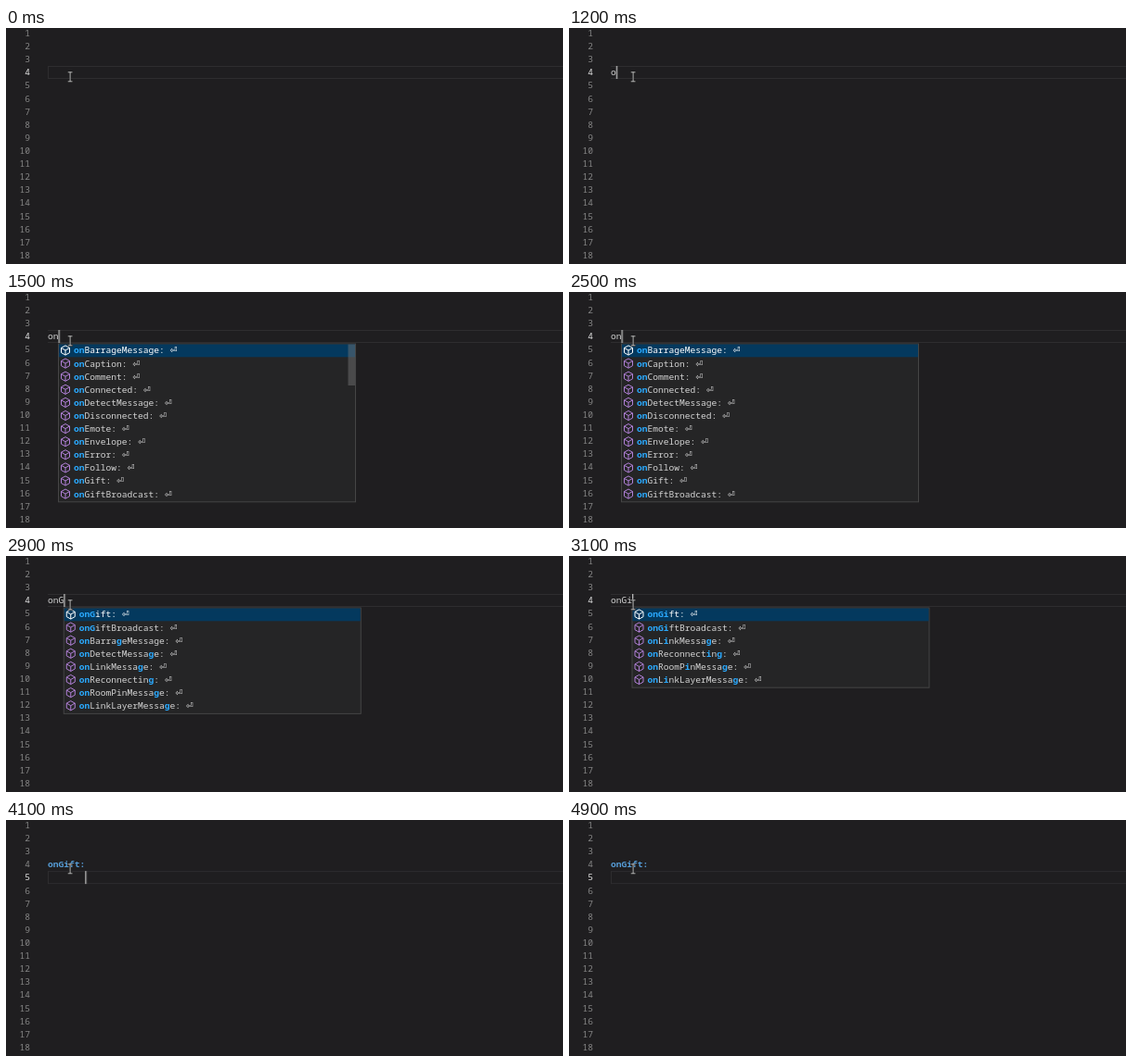
Write an HTML page that moves like this. It is 600 px wide and 255 px high and loops after 5 s.

```html
<!DOCTYPE html>
<html lang="en">
<head>
<meta charset="utf-8">
<title>Editor completion</title>
<style>
  html, body { margin: 0; width: 100%; height: 100%; overflow: hidden; background: #1f1e20; }
  svg { display: block; width: 600px; height: 255px; }
  text { font: 9.58px "Noto Sans Mono", "DejaVu Sans Mono", monospace; fill: #d4d4d4; }
  .num { fill: #858585; text-anchor: end; }
  .hit { fill: #2aaaff; font-weight: 700; }
  .enter { font-family: "DejaVu Sans", sans-serif; }
  .cube { fill: none; stroke: #b180d7; stroke-linejoin: round; }
  .picked text { fill: #fff; }
  .picked .cube { stroke: #fff; }
  .done { fill: #569cd6; font-weight: 700; }
  .line { fill: none; stroke: #2e2d2f; }

  .step { animation: 5s step-end infinite; }
  .line { animation-name: next-line; }
  .edge { animation-name: edge; }
  .caret { fill: #c8c8c8; animation-name: caret; }
  .bar { fill: #797979; animation: bar 5s linear infinite; }
  #n4 { animation-name: leave; }
  #n5 { animation-name: enter; }

  @keyframes next-line { 0% { transform: none; } 82%, 100% { transform: translateY(14.12px); } }
  @keyframes edge { 0% { opacity: 1; } 24% { opacity: 0; } 82%, 100% { opacity: 1; } }
  @keyframes leave { 0% { fill: #e0e0e0; } 82%, 100% { fill: #858585; } }
  @keyframes enter { 0% { fill: #858585; } 82%, 100% { fill: #e0e0e0; } }
  @keyframes bar { 0%, 36% { opacity: .45; } 47%, 100% { opacity: 0; } }
  @keyframes caret {
    0%  { opacity: 0; transform: none; }
    10% { opacity: 1; transform: none; }
    20% { opacity: 0; transform: none; }
    24% { opacity: 1; transform: translate(5.75px, 0); }
    28% { opacity: 1; transform: translate(11.5px, 0); }
    38% { opacity: 0; transform: translate(11.5px, 0); }
    48% { opacity: 1; transform: translate(11.5px, 0); }
    58% { opacity: 1; transform: translate(17.25px, 0); }
    62% { opacity: 1; transform: translate(23px, 0); }
    64% { opacity: 1; transform: translate(28.75px, 0); }
    74% { opacity: 0; transform: translate(28.75px, 0); }
    82% { opacity: 1; transform: translate(40.25px, 14.12px); }
    90%, 100% { opacity: 0; transform: translate(40.25px, 14.12px); }
  }
</style>
</head>
<body>
<svg viewBox="0 0 600 255">
  <g class="line step">
    <path d="M45 41.5H602M45 54.5H602"/>
    <path class="edge step" d="M45.5 41V55"/>
  </g>
  <g id="gutter"></g>
  <g id="states"></g>
  <rect class="caret step" x="45.1" y="41" width="1.2" height="14"/>
  <g fill="none" stroke-linecap="square">
    <path d="M67.2 47.8H71M69.1 48V57.5M67.2 57.8H71" stroke="#1a1a1a" stroke-width="2"/>
    <path d="M67.2 47.8H71M69.1 48V57.5M67.2 57.8H71" stroke="#c4c4c4" stroke-width=".9"/>
  </g>
</svg>
<script>
const LOOP = 5000, PITCH = 14.12, CHAR = 5.75, LEFT = 45;
const baseline = line => 8.9 + PITCH * (line - 1);

const events = ('BarrageMessage Caption Comment Connected DetectMessage Disconnected ' +
  'Emote Envelope Error Follow Gift GiftBroadcast').split(' ');
const gifts = ['Gift', 'GiftBroadcast'];
const links = ['LinkMessage', 'Reconnecting', 'RoomPinMessage', 'LinkLayerMessage'];

const states = [
  { from: 1200, to: 1400, text: 'o' },
  { from: 1400, to: 2900, text: 'on', items: events, bar: true },
  { from: 2900, to: 3100, text: 'onG', items: [...gifts, 'BarrageMessage', 'DetectMessage', ...links] },
  { from: 3100, to: 3200, text: 'onGi', items: [...gifts, ...links] },
  { from: 3200, to: 4100, text: 'onGif', items: gifts },
  { from: 4100, to: LOOP, text: 'onGift:', cls: 'done' }
];

// Positions of the query letters in order, or null
function find(label, query) {
  const hits = new Set();
  let at = -1;
  for (const c of query.toLowerCase()) {
    at = label.toLowerCase().indexOf(c, at + 1);
    if (at < 0) return null;
    hits.add(at);
  }
  return hits;
}

function mark(label, query) {
  const swapped = query.slice(0, -2) + query.at(-1) + query.at(-2);
  const hits = find(label, query) || find(label, swapped);
  const runs = [];
  [...label].forEach((c, i) => {
    const hit = hits.has(i), last = runs.at(-1);
    if (last && last.hit === hit) last.s += c;
    else runs.push({ hit, s: c });
  });
  return runs.map(r => r.hit ? `<tspan class="hit">${r.s}</tspan>` : r.s).join('');
}

function row(name, i, query) {
  const label = `on${name}:`, y = 63 + 14.1 * i;
  return `<g class="${i ? '' : 'picked'}" transform="translate(0 ${y})">
    <path class="cube" d="M8-5.1L12.5-2.6V2.6L8 5.1L3.5 2.6V-2.6ZM3.5-2.6L8 0L12.5-2.6M8 0V5.1"/>
    <text x="17" y="3.4">${mark(label, query)}</text>
    <text class="enter" x="${17 + CHAR * (label.length + 1)}" y="3.4">⏎</text></g>`;
}

function popup({ text, items, bar }) {
  const x = LEFT + CHAR * text.length - .5, h = items.length * 14.1 + 1.6;
  return `<g transform="translate(${x} 0)">
    <rect x=".5" y="56" width="320" height="${h}" fill="#252526" stroke="#454545"/>
    <rect x="1" y="56.5" width="319" height="13.8" fill="#04395e"/>
    ${items.map((name, i) => row(name, i, text)).join('')}
    ${bar ? '<rect class="bar" x="312.5" y="56.5" width="7.5" height="44.5"/>' : ''}</g>`;
}

let numbers = '', layers = '', rules = '';
for (let n = 1; n <= 18; n++)
  numbers += `<text id="n${n}" class="num step" x="26" y="${baseline(n)}">${n}</text>`;

states.forEach((s, i) => {
  const a = s.from / LOOP * 100, b = s.to / LOOP * 100;
  const end = b < 100 ? `${b}%, 100% { visibility: hidden }` : '100% { visibility: visible }';
  rules += `@keyframes state${i} { 0% { visibility: hidden } ${a}% { visibility: visible } ${end} }\n`;
  layers += `<g class="step" style="animation-name: state${i}">
    <text class="${s.cls || ''}" x="${LEFT}" y="${baseline(4)}">${s.text}</text>
    ${s.items ? popup(s) : ''}</g>`;
});

document.head.appendChild(document.createElement('style')).textContent = rules;
document.getElementById('gutter').innerHTML = numbers;
document.getElementById('states').innerHTML = layers;
</script>
</body>
</html>
```
